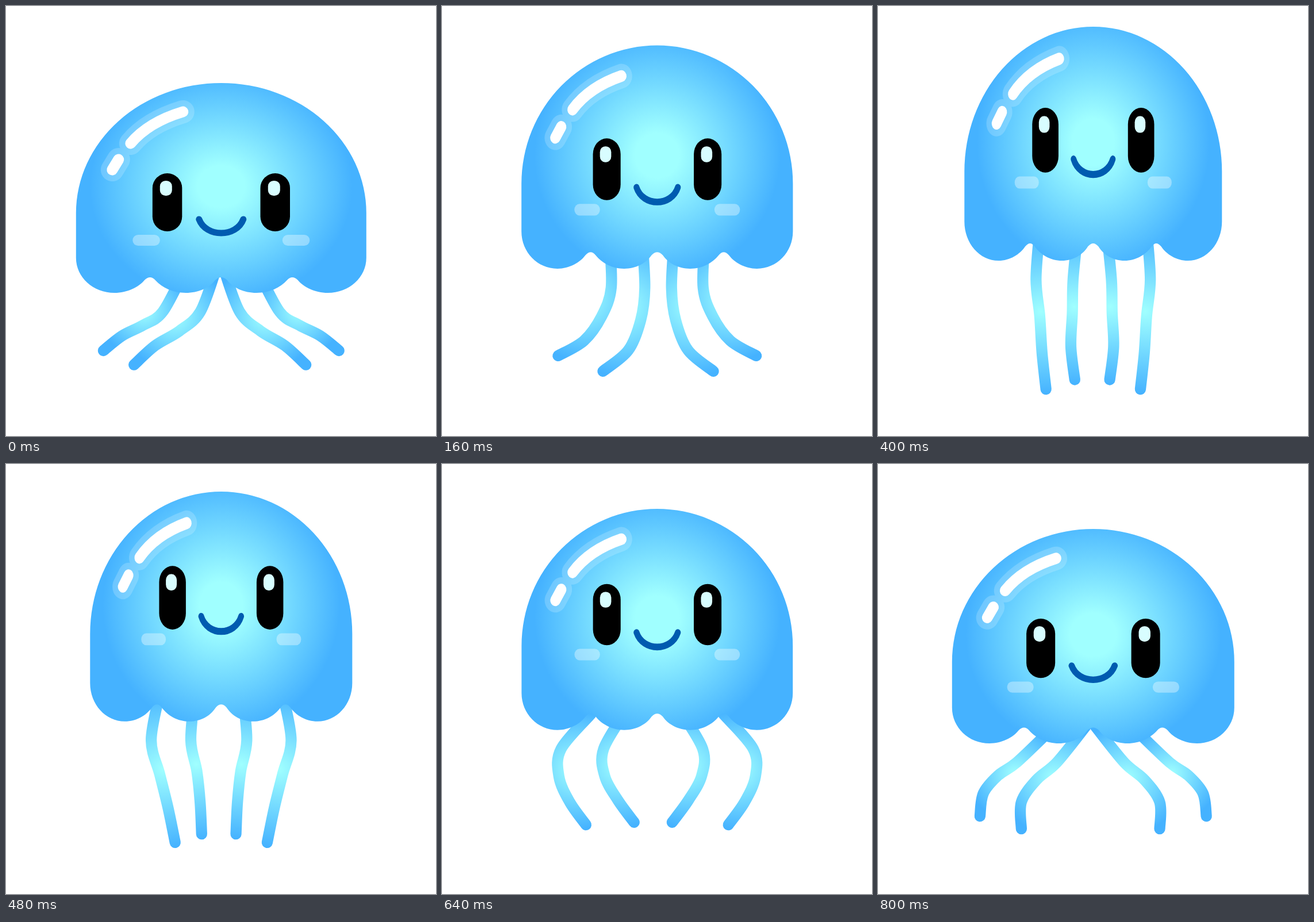
An HTML page with a canvas that plays this animation: 748x748 px, repeating every 0.88 s.

```html
<!DOCTYPE html>
<html lang="en">
<head>
<meta charset="utf-8">
<title>Jellyfish</title>
<style>
  html, body { margin: 0; width: 100%; height: 100%; overflow: hidden; background: #fff; }
  canvas { display: block; }
</style>
</head>
<body>
<canvas id="stage" width="748" height="748"></canvas>
<script>
const ctx = document.getElementById('stage').getContext('2d');
const STEP = 80, STEPS = 11, MID = 374.3;
const GLOW = '#a0ffff', BLUE = '#45b2ff';

// Bell poses: step, half width, top, bottom, vertical shift of the face
const bellPoses = [
  [0, 252.5, 134, 499, 0], [1, 243, 95, 473, 7.5], [3, 230.5, 49, 446, -20],
  [5, 224, 36, 443, -34], [7, 233.5, 65, 455, -46], [9, 238.5, 92, 472, -18.5],
  [10, 245.5, 113, 486, -4.4]
];

// x: mean neck position, sway: its swing, tilt: mean angle, flex and whip: bending,
// size, stretch, stretchAt: segment length, its change and when it peaks
const outer = { x: 259, sway: 43, tilt: 19, flex: 26, whip: 3.5, size: 52, stretch: 12, stretchAt: 4.7 };
const inner = { x: 325, sway: 35, tilt: 15, flex: 19, whip: 5, size: 53, stretch: 7, stretchAt: 3.7 };
const tentacles = [
  { ...outer, side: 1 }, { ...outer, side: -1 },
  { ...inner, side: 1 }, { ...inner, side: -1, x: 330, sway: 26 }
];

// Cosine that peaks at the given step, repeating `times` per loop
const wave = (step, peak, times = 1) => Math.cos(2 * Math.PI * times * (step - peak) / STEPS);

// Smooth cyclic interpolation (cubic Hermite) between bell poses
function bellAt(step) {
  const n = bellPoses.length;
  const pose = i => {
    const [time, ...values] = bellPoses[(i + n) % n];
    return { time: time + STEPS * Math.floor(i / n), values };
  };
  let i = n - 1;
  while (pose(i).time > step) i--;
  const [p, a, b, q] = [-1, 0, 1, 2].map(k => pose(i + k));
  const span = b.time - a.time, u = (step - a.time) / span, v = 1 - u;
  return a.values.map((from, j) => {
    const slope = (l, r) => (r.values[j] - l.values[j]) / (r.time - l.time);
    return from * v * v * (1 + 2 * u) + b.values[j] * u * u * (3 - 2 * u)
      + span * u * v * (slope(p, b) * v - slope(a, q) * u);
  });
}

function radial(x, y, r, core) {
  const g = ctx.createRadialGradient(x, y, 0, x, y, r);
  g.addColorStop(core, GLOW);
  g.addColorStop(1, BLUE);
  return g;
}

function stroke(path, width, style) {
  ctx.lineWidth = width;
  ctx.strokeStyle = style;
  ctx.stroke(path);
}

function pill(x, y, w, h, r, style) {
  ctx.fillStyle = style;
  ctx.beginPath();
  ctx.roundRect(x, y, w, h, r);
  ctx.fill();
}

// Outward angle of a segment: a bend that travels from root to tip
function bend(t, i, step) {
  const degrees = t.tilt - 2.7 * i
    + (t.flex + 7 * i) * wave(step, 3.54 * (i / 3) ** 0.55 - 2)
    + t.whip * (2 + i) * wave(step, 0.8 * i - 1.6, 2);
  return degrees * Math.PI / 180;
}

// The root reaches back from the neck into the bell, three segments hang below
function joints(t, bottom, step) {
  const neck = {
    x: t.x + t.sway * wave(step, 2.6) + 10 * wave(step, 0.15, 2),
    y: bottom + 33
  };
  const move = (p, angle, d) => ({ x: p.x - d * Math.sin(angle), y: p.y + d * Math.cos(angle) });
  const points = [move(neck, bend(t, 0, step), -80), neck];
  const length = t.size + t.stretch * wave(step, t.stretchAt);
  for (let i = 1; i <= 3; i++) points.push(move(points[i], bend(t, i, step), length));
  return points.map(({ x, y }) => ({ x: MID + t.side * (x - MID), y }));
}

function drawTentacle(points) {
  const last = points.length - 1, path = new Path2D();
  const at = i => points[Math.max(0, Math.min(last, i))];
  const handle = (i, sign) => ['x', 'y'].map(k => at(i)[k] + sign * (at(i + 1)[k] - at(i - 1)[k]) / 6);
  path.moveTo(at(0).x, at(0).y);
  for (let i = 0; i < last; i++) {
    path.bezierCurveTo(...handle(i, 1), ...handle(i + 1, -1), at(i + 1).x, at(i + 1).y);
  }
  const [x, y] = ['x', 'y'].map(k => {
    const values = points.map(p => p[k]);
    const min = Math.min(...values), max = Math.max(...values);
    return { mid: (min + max) / 2, half: (max - min) / 2 };
  });
  stroke(path, 19.3, radial(x.mid, y.mid, Math.max(x.half, y.half) + 9, 0));
}

const bellShape = new Path2D(`M122 438V360A252.5 226 0 0 1 627 360V438
  C627 472 597 499 560 499C538 499 518 489 508 477Q498 467 489 477
  C477 490 458 499 436 499C414 499 395 490 385 477Q374.5 467 364 477
  C354 490 335 499 313 499C291 499 272 490 260 477Q251 467 241 477
  C231 489 211 499 189 499C152 499 122 472 122 438Z`);
const shine = new Path2D('M217 239Q248 202 308 184M196 267L185 285');
const smile = new Path2D('M336 371C348 403 401 403 413 371');

function drawBell([half, top, bottom, shift]) {
  const sx = half / 252.5, sy = (bottom - top) / 365;
  ctx.save();
  ctx.translate(MID, bottom);
  ctx.scale(sx, sy);
  ctx.translate(-374.5, -499);

  ctx.save();
  ctx.clip(bellShape);
  ctx.translate(374.5, 314);
  ctx.scale(1.13, 1);
  ctx.fillStyle = radial(0, 0, 202, 0.18);
  ctx.fillRect(-300, -300, 600, 600);
  ctx.restore();

  stroke(shine, 40, 'rgba(255,255,255,.18)');
  stroke(shine, 19, '#fff');

  ctx.translate(0, shift / sy);
  for (const x of [255, 442.7]) pill(x, 291, 51.5, 101, 25.7, '#000');
  for (const x of [268, 456]) pill(x, 304, 21, 26, 9.5, '#d8fdff');
  for (const x of [220.5, 481]) pill(x, 398, 47.5, 19, 9.5, 'rgba(255,255,255,.35)');
  stroke(smile, 11, '#005bb0');
  ctx.restore();
}

function draw() {
  const step = Math.floor(performance.now() / STEP) % STEPS;
  const bell = bellAt(step);
  ctx.clearRect(0, 0, 748, 748);
  ctx.lineCap = 'round';
  for (const t of tentacles) drawTentacle(joints(t, bell[2], step));
  drawBell(bell);
  requestAnimationFrame(draw);
}
draw();
</script>
</body>
</html>
```
